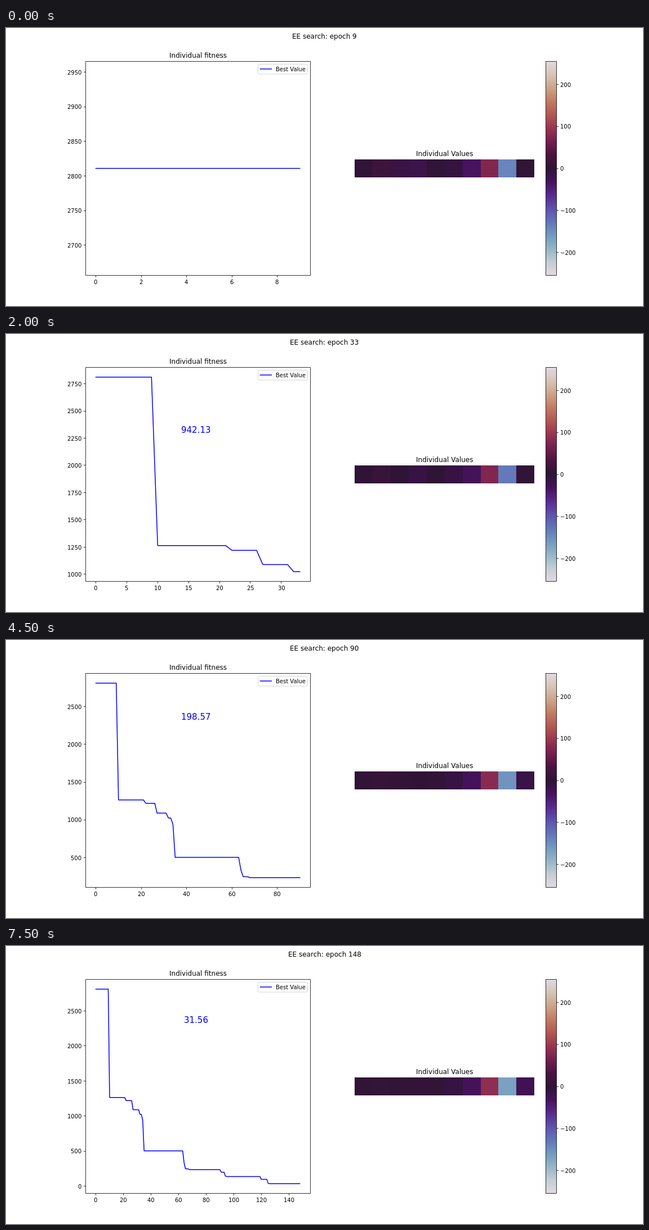
Write an HTML page with a canvas that moves like this. It is 1131x495 px and loops after 8000 ms.

```html
<!DOCTYPE html>
<html>
<head>
<meta charset="utf-8">
<style>
html, body { margin: 0; overflow: hidden; background: #fff; }
canvas { display: block; }
</style>
</head>
<body>
<canvas id="stage" width="1131" height="495"></canvas>
<script>
const ctx = document.getElementById('stage').getContext('2d');
const STEP = 500, COUNT = 16;
const LEFT = 141.5, RIGHT = 540.5, TOP = 59.5, BOTTOM = 440.5;

// [first epoch, best value from then on]
const best = [
  [0, 2811], [10, 1264], [22, 1220], [27, 1090], [32, 1023.98], [34, 942.13],
  [35, 503.36], [64, 334.72], [65, 247.35], [68, 234.86], [91, 198.57],
  [94, 142.18], [95, 136.49], [120, 98.24], [125, 40.17], [126, 35.62], [149, 31.56]
];

// Gene poses: first, middle and settled
const MIDDLE = 5, SETTLED = 11;
const poses = [
  [-1, 18, -12, -18, 2, -8, -33, 75, -141, 3],
  [0, 9, 3, -10, 1, -12, -28, 74, -128, 4],
  [4, 6, 4, 5, 3, -11, -30, 86, -168, -24]
];

const twilight = ('e2d9e2 c3ced4 95b5c7 7299c0 6276ba 5e51ad 592a8f 46125c 2f1436 ' +
  '4a1341 741e4f 993550 b25652 c27b63 cca389 d7c4b6 e2d9e2').split(' ')
  .map(hex => [0, 2, 4].map(i => parseInt(hex.slice(i, i + 2), 16)));

const mix = (a, b, f) => a.map((v, i) => v + (b[i] - v) * f);
const snap = v => Math.floor(v) + 0.5;

function colour(value) {
  const p = (value / 510 + 0.5) * 16, i = Math.min(15, Math.floor(p));
  return `rgb(${mix(twilight[i], twilight[i + 1], p - i).map(Math.round)})`;
}

function genesAt(k) {
  return k < MIDDLE
    ? mix(poses[0], poses[1], k / MIDDLE)
    : mix(poses[1], poses[2], Math.min(1, (k - MIDDLE) / (SETTLED - MIDDLE)));
}

// Text starts on a whole pixel; anchor is 0 left, 0.5 centre, 1 right
function text(str, x, baseline, size = 10, anchor = 0.5, fill = '#000') {
  ctx.font = `${size}px "DejaVu Sans", sans-serif`;
  ctx.fillStyle = fill;
  const start = x - ctx.measureText(str).width * anchor;
  ctx.fillText(str, Math.round(start), Math.round(baseline));
}

function path(points, style = '#000', width = 0.8) {
  ctx.strokeStyle = style;
  ctx.lineWidth = width;
  ctx.beginPath();
  points.forEach(p => ctx.lineTo(...p));
  ctx.stroke();
}

function frame(x, y, w, h) {
  ctx.strokeStyle = '#000';
  ctx.lineWidth = 0.8;
  ctx.strokeRect(x, y, w, h);
}

function sideTick(x, y, label, labelX, anchor) {
  path([[x, snap(y)], [x + 3.5, snap(y)]]);
  text(String(label).replace('-', '\u2212'), labelX, y + 4.15, 10, anchor);
}

// Round tick values for at most nine intervals over the padded range
function ticks(lo, hi) {
  const pad = (hi - lo) * 0.05, raw = (hi - lo) * 1.1 / 9;
  const unit = 10 ** Math.floor(Math.log10(raw));
  const step = unit * [1, 2, 2.5, 5, 10].find(s => s * unit >= raw);
  const list = [];
  for (let v = Math.ceil((lo - pad) / step) * step; v <= hi + pad; v += step) list.push(v);
  return list;
}

function drawFitness(k) {
  const [next, found] = best[k + 1], last = next - 1, max = best[0][1];
  let lo = best[k][1], hi = max;
  if (lo === hi) { lo *= 0.95; hi *= 1.05; }
  const px = e => 159.5 + e / last * 362.3;
  const py = v => 423.2 - (v - lo) / (hi - lo) * 346.5;

  text('EE search: epoch ' + last, 565.5, 19, 12);
  text('Individual fitness', 340.6, 53, 12);

  for (const e of ticks(0, last)) {
    const x = snap(px(e));
    path([[x, BOTTOM], [x, BOTTOM + 3.5]]);
    text(e, px(e), 456);
  }
  for (const v of ticks(lo, hi)) sideTick(LEFT - 3.5, py(v), v, 134.4, 1);

  const line = [];
  for (let i = 0; i <= k; i++) {
    const [start, value] = best[i];
    line.push([px(start), py(value)], [px(best[i + 1][0] - 1), py(value)]);
  }
  ctx.lineCap = 'square';
  path(line, '#00f', 1.5);
  ctx.lineCap = 'butt';
  frame(LEFT, TOP, RIGHT - LEFT, BOTTOM - TOP);

  const noteY = py(max * 0.8);
  if (noteY < BOTTOM) text(found.toFixed(2), 337, noteY - 10, 15, 0.5, '#00f');

  ctx.beginPath();
  ctx.roundRect(447.5, 64.5, 88, 17.5, 2);
  ctx.fillStyle = 'rgba(255,255,255,.8)';
  ctx.fill();
  ctx.strokeStyle = '#d6d6d6';
  ctx.lineWidth = 1;
  ctx.stroke();
  path([[450.7, 73], [472, 73]], '#00f', 1.5);
  text('Best Value', 479, 77, 10, 0);
}

function drawGenes(k) {
  const edge = i => Math.round(619.46 + i * 31.87);
  text('Individual Values', 778.8, 228, 12);
  genesAt(k).forEach((v, i) => {
    ctx.fillStyle = colour(v);
    ctx.fillRect(edge(i), 234, edge(i + 1) - edge(i), 32);
  });
}

function drawColourBar() {
  const fill = ctx.createLinearGradient(0, BOTTOM, 0, TOP);
  for (let i = 0; i <= 16; i++) fill.addColorStop(i / 16, colour(i * 510 / 16 - 255));
  ctx.fillStyle = fill;
  ctx.fillRect(958.5, TOP, 19, BOTTOM - TOP);
  frame(958.5, TOP, 19, BOTTOM - TOP);
  for (let v = -200; v <= 200; v += 100) sideTick(977.5, 250 - v * 381 / 510, v, 984.2, 0);
}

function draw(now) {
  const k = Math.floor(now / STEP) % COUNT;
  ctx.fillStyle = '#fff';
  ctx.fillRect(0, 0, 1131, 495);
  ctx.lineJoin = 'round';
  drawFitness(k);
  drawGenes(k);
  drawColourBar();
  requestAnimationFrame(draw);
}
requestAnimationFrame(draw);
</script>
</body>
</html>
```
